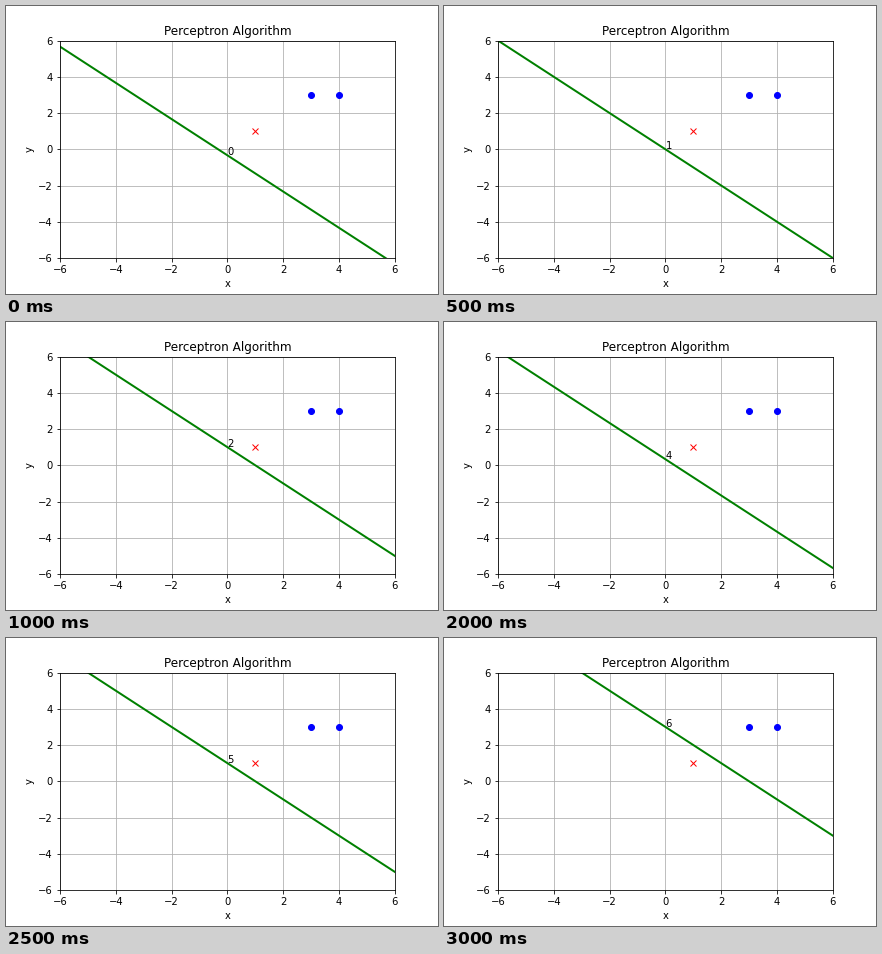
Animation, 432 px wide and 288 px high, one loop 3500 ms. Source, as a matplotlib script:

```python
import numpy as np
import matplotlib.pyplot as plt
from matplotlib.animation import FuncAnimation

plt.rcParams.update({"font.family": "DejaVu Sans", "font.size": 10})

SAMPLES = [((3, 3), 1), ((4, 3), 1), ((1, 1), -1)]
LIMIT = 6
STEP_MS = 500


def train(samples):
    """Return the weights and bias after every perceptron update."""
    w, b, history = np.zeros(2), 0, []
    while True:
        wrong = [(np.array(x), y) for x, y in samples if y * (w @ x + b) <= 0]
        if not wrong:
            return history
        x, y = wrong[0]
        w, b = w + y * x, b + y
        history.append((w, b))


history = train(SAMPLES)

fig, ax = plt.subplots(figsize=(6, 4), dpi=72)
fig.subplots_adjust(left=0.125, right=0.9, bottom=0.125, top=0.88)
ax.set(xlim=(-LIMIT, LIMIT), ylim=(-LIMIT, LIMIT),
       xlabel="x", ylabel="y", title="Perceptron Algorithm")
ax.grid(True)

boundary, = ax.plot([], [], "g", lw=2)
for (px, py), label in SAMPLES:
    ax.plot(px, py, "bo" if label > 0 else "rx", ms=6)
counter = ax.text(0, 0, "")


def update(step):
    # Zero weights define no line, so the previous boundary stays.
    while not history[step][0].any():
        step -= 1
    w, b = history[step]
    xs = np.array([-LIMIT - 1, LIMIT + 1])
    boundary.set_data(xs, -(b + w[0] * xs) / w[1])
    counter.set_position((0, -b / w[1]))
    counter.set_text(str(step))
    return boundary, counter


animation = FuncAnimation(fig, update, frames=len(history), interval=STEP_MS,
                          repeat=True, repeat_delay=0)
plt.show()
```
